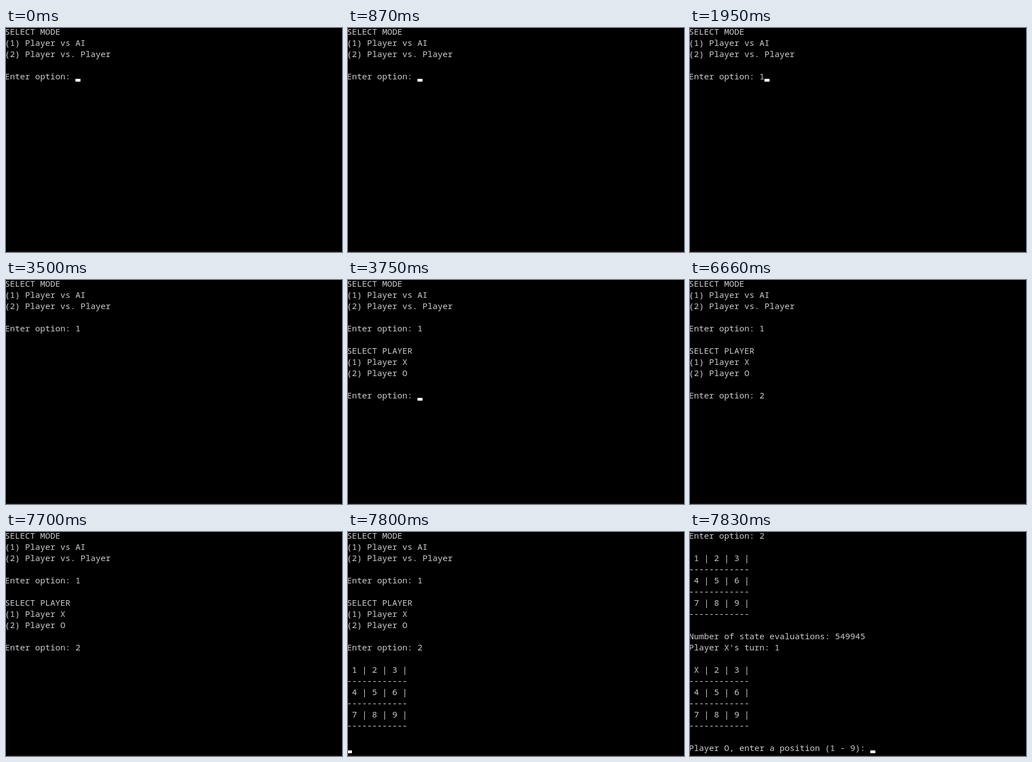
These frames come from a looping animation (600 by 401 pixels, 8 s). An HTML page:

```html
<!DOCTYPE html>
<html lang="en">
<head>
<meta charset="utf-8">
<title>Console game</title>
<style>
  html, body { margin: 0; width: 100%; height: 100%; overflow: hidden; background: #000; }
  svg { display: block; }
  text {
    font: 15px "Noto Sans Mono", "DejaVu Sans Mono", monospace;
    font-variant-ligatures: none;
    white-space: pre;
    fill: #ccc;
  }
</style>
</head>
<body>
<svg width="600" height="401" viewBox="0 0 600 401">
  <rect width="600" height="401" fill="#000"/>
  <g id="screen"></g>
  <rect id="cursor" width="9" height="5" fill="#fff"/>
  <rect y="400" width="600" height="1" fill="#321010"/>
</svg>
<script>
const LOOP = 8000, CELL = 9, LINE = 20, LEFT = -2, BASE = 12, ROWS = 20;
const screen = document.getElementById('screen');
const cursor = document.getElementById('cursor');

const board = cells => [0, 3, 6].flatMap(i => [
  [...cells.slice(i, i + 3)].map(c => ` ${c} |`).join(''),
  '-'.repeat(12)
]);

const prompt = 'Enter option: ';
const mode = ['SELECT MODE', '(1) Player vs AI', '(2) Player vs. Player', '', prompt];
const modeSet = [...mode.slice(0, -1), prompt + '1'];
const side = [...modeSet, '', 'SELECT PLAYER', '(1) Player X', '(2) Player O', '', prompt];
const sideSet = [...side.slice(0, -1), prompt + '2'];
const start = [...sideSet, '', ...board('123456789'), '', ''];
const turn = [
  ...start.slice(0, -1),
  'Number of state evaluations: 549945', "Player X's turn: 1", '',
  ...board('X23456789'), '',
  'Player O, enter a position (1 - 9): '
];

// [time, printed lines, cursor visible]
const steps = [
  [0, mode, 1], [360, mode, 0], [870, mode, 1], [1400, mode, 0],
  [1950, modeSet, 1], [2480, modeSet, 0], [2990, modeSet, 1], [3500, modeSet, 0],
  [3750, side, 1], [4570, side, 0], [5080, side, 1], [5620, side, 0],
  [5720, sideSet, 1], [6660, sideSet, 0], [7190, sideSet, 1], [7700, sideSet, 0],
  [7800, start, 1], [7830, turn, 1]
];

const rows = Array.from({ length: ROWS }, (_, i) => {
  const row = document.createElementNS('http://www.w3.org/2000/svg', 'text');
  row.setAttribute('x', LEFT);
  row.setAttribute('y', BASE + i * LINE);
  return screen.appendChild(row);
});

function show([, lines, visible]) {
  const page = lines.slice(-ROWS);
  const last = page.length - 1;
  rows.forEach((row, i) => { row.textContent = page[i] || ''; });
  cursor.setAttribute('x', LEFT + page[last].length * CELL);
  cursor.setAttribute('y', last * LINE + 11);
  cursor.setAttribute('visibility', visible ? 'visible' : 'hidden');
}

let current;
function tick() {
  const t = performance.now() % LOOP;
  const step = steps.findLast(s => s[0] <= t);
  if (step !== current) show(current = step);
  requestAnimationFrame(tick);
}
tick();
</script>
</body>
</html>
```
